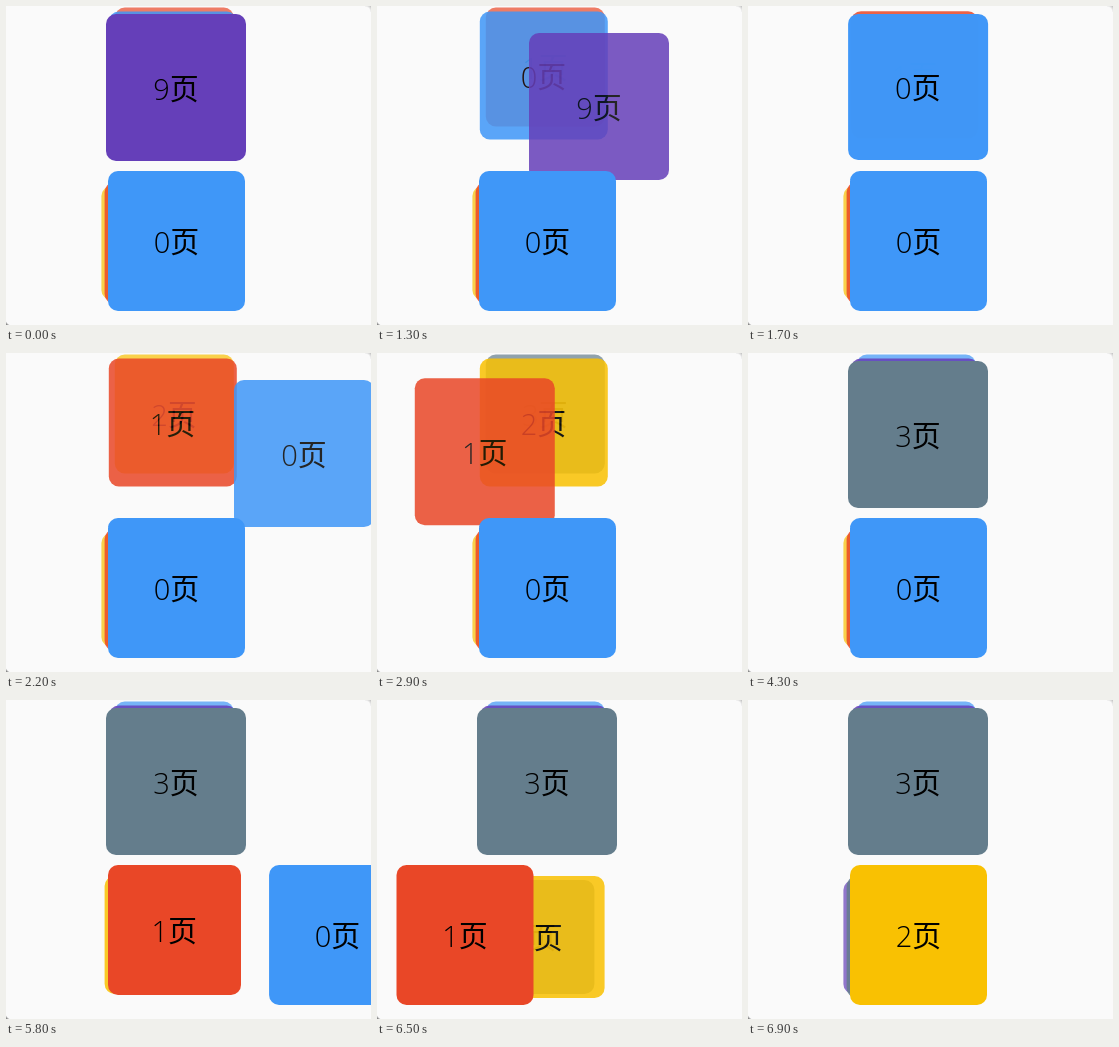
Recreate the animation shown at these times as an HTML page. Size 365x319 px, loop 7500 ms.

```html
<!DOCTYPE html>
<html lang="zh-CN">
<head>
<meta charset="utf-8">
<title>卡片堆叠</title>
<style>
  html, body { margin: 0; width: 100%; height: 100%; overflow: hidden; background: #fafafa; }
  #stage { position: relative; width: 365px; height: 319px; overflow: hidden; }
  .card {
    position: absolute; left: 0; top: 0; border-radius: 10px; box-sizing: border-box; padding-top: 2px;
    display: flex; align-items: center; justify-content: center;
    font: 350 29px/40px "Open Sans", "Noto Sans CJK SC", "Noto Sans CJK", sans-serif;
    color: #000; white-space: nowrap;
  }
  .corner { position: absolute; width: 6px; height: 6px; z-index: 20; }
  .bl { left: 0; bottom: 0; background: radial-gradient(circle at 100% 0, transparent 6px, #8a8a8a 7.5px); }
  .tr { right: 0; top: 0; background: radial-gradient(circle at 0 100%, transparent 5px, #c4c4c4 8px); }
</style>
</head>
<body>
<div id="stage"><i class="corner bl"></i><i class="corner tr"></i></div>
<script>
const LOOP = 7500, STEP = 100;
const COLORS = ['#3f97f8', '#e94727', '#f9c102', '#647d8c', '#653fb9'];
const stage = document.getElementById('stage');

const clamp = (v, max = 1) => Math.max(0, Math.min(max, v));
const mix = (a, b, k) => a + (b - a) * k;
const easeOut = k => 1 - (1 - clamp(k)) ** 2;
const box = (x, y, w, h) => ({ x, y, w, h });

// The card follows the pointer to `drag`, then is flung on to `fling`.
const swipe = (start, release, end, drag, fling) => ({ start, release, end, drag, fling });

const stacks = [
  {
    firstPage: 9,
    levels: [box(100, 8, 140, 147), box(102.8, 5.5, 127.5, 127.5), box(108.8, 1.5, 118.5, 118.5)],
    fade: true, lead: 1,
    swipes: [
      swipe(800, 1300, 1800, [52, 19], [340, 170]),
      swipe(2100, 2200, 2500, [128, 19], [400, 19]),
      swipe(2900, 3100, 3400, [-112, 31], [-260, 60]),
      swipe(3900, 4000, 4300, [110, 11], [300, 11])
    ]
  },
  {
    firstPage: 0,
    levels: [box(102, 165, 137, 140), box(98.6, 176, 129, 122), box(95.4, 180, 122, 114)],
    fade: false, lead: 2.3,
    swipes: [
      swipe(5400, 5700, 6100, [60, 0], [291, 0]),
      swipe(6500, 6600, 6900, [-110, 0], [-260, 0])
    ]
  }
];

const settle = (s, t) => easeOut((t - s.release) / (s.end - s.release));

function offsetAt(s, t) {
  const pull = easeOut((t - s.start + STEP) / (s.release - s.start + STEP));
  return s.drag.map((d, axis) => mix(d * pull, s.fling[axis], settle(s, t)));
}

function levelAt(levels, depth, key) {
  const d = clamp(depth, levels.length - 1);
  const i = Math.min(levels.length - 2, Math.floor(d));
  return mix(levels[i][key], levels[i + 1][key], d - i);
}

function makeCard(page, order) {
  const card = document.createElement('div');
  card.className = 'card';
  card.style.background = COLORS[page % 5];
  card.style.zIndex = 10 - order;
  card.textContent = page + '页';
  stage.append(card);
  return card;
}

for (const stack of stacks) {
  const count = stack.swipes.length + stack.levels.length;
  stack.cards = Array.from({ length: count }, (_, i) => makeCard((stack.firstPage + i) % 10, i));
}

function drawStack({ levels, swipes, cards, fade, lead }, t) {
  const progress = swipes.map(s => settle(s, t));
  const sizeShift = progress.reduce((sum, p) => sum + p, 0);
  const placeShift = progress.reduce((sum, p) => sum + clamp(p * lead), 0);

  cards.forEach((card, i) => {
    const place = key => levelAt(levels, i - placeShift, key);
    const size = key => levelAt(levels, i - sizeShift, key);
    const s = swipes[i];
    const moving = s && t >= s.start;
    const [dx, dy] = moving ? offsetAt(s, t) : [0, 0];

    let opacity = 1 - 0.15 * clamp(i - placeShift, 2);
    if (i - sizeShift > 2) opacity = 0;
    if (moving && fade) opacity = 0.85 * (1 - progress[i]);

    Object.assign(card.style, {
      transform: `translate(${place('x') + dx}px, ${place('y') + dy}px)`,
      width: size('w') + 'px',
      height: size('h') + 'px',
      opacity
    });
  });
}

const began = performance.now();
function frame() {
  const elapsed = (performance.now() - began) % LOOP;
  const t = Math.floor(elapsed / STEP) * STEP;
  stacks.forEach(stack => drawStack(stack, t));
  requestAnimationFrame(frame);
}
frame();
</script>
</body>
</html>
```
